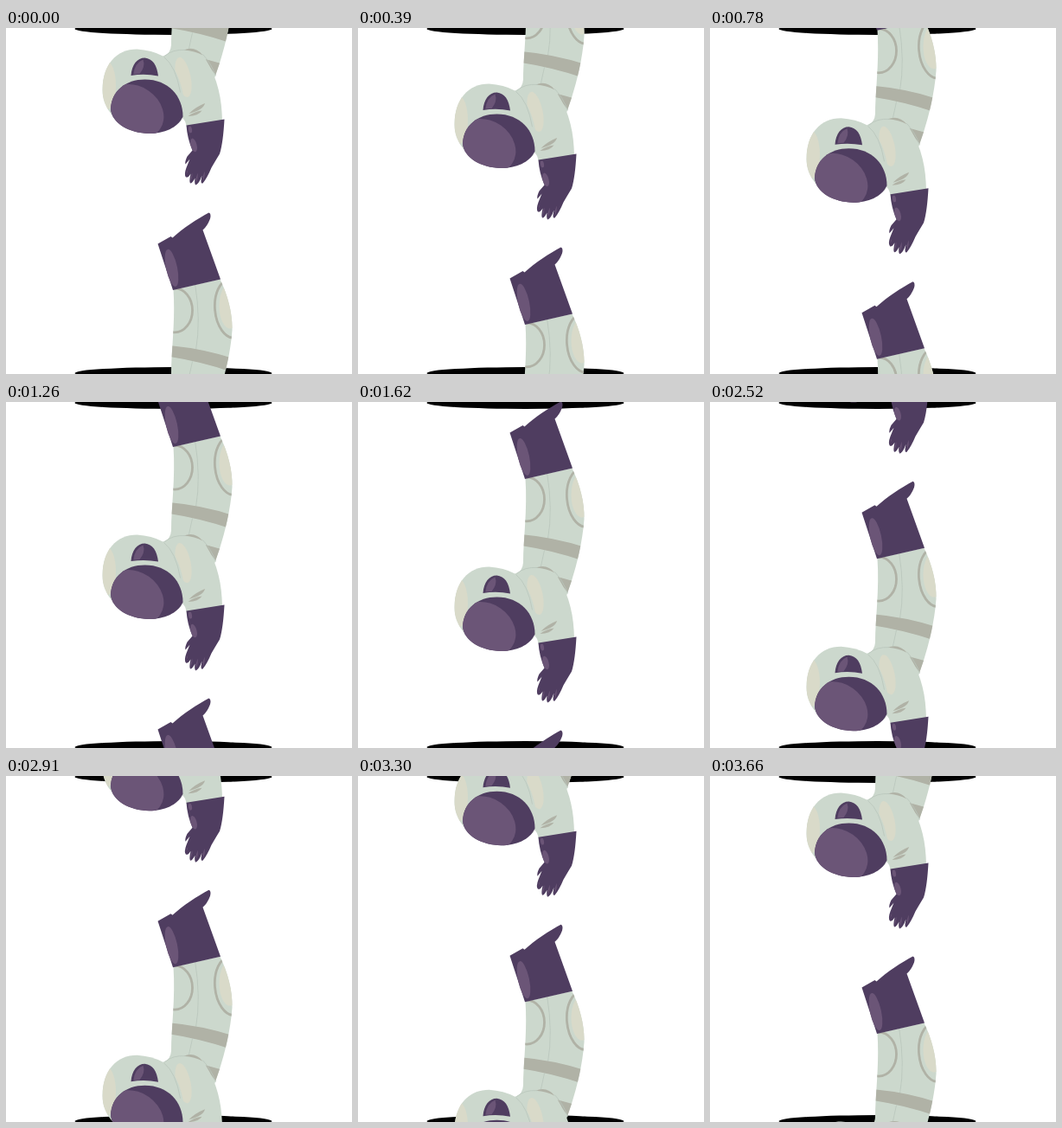
Recreate the animation shown at these times as an HTML page. Size 400x400 px, loop 3.69 s.

```html
<!DOCTYPE html>
<html lang="en">
<head>
<meta charset="utf-8">
<title>Endless fall</title>
<style>
  html, body { margin: 0; width: 100%; height: 100%; overflow: hidden; background: #fff; }
  svg { display: block; width: 100vw; height: 100vh; }
  .suit { fill: #ccd8cd; }
  .shade { fill: #b0b2a6; }
  .cream { fill: #d9dac9; }
  .dark { fill: #4f3d60; }
  .glow { fill: #6b5577; }
  .ring { fill: none; stroke: #b0b2a6; stroke-width: 2.8; }
  .seam { fill: none; stroke: #b9c6bb; stroke-width: .8; }
</style>
</head>
<body>
<svg viewBox="0 0 400 400">
  <defs>
    <path id="legShape" d="M193 129L247 117C256 136 261.500 156 261 176C259 203 252.500 228 246.500 247L240 266L206 275L182 240Q190 235 190.500 226C190.500 200 195.500 165 193 129Z"/>
    <path id="helmetShape" d="M111 72C111 43 127 25 151 25Q168 26 181 33C196 43 205 70 206 92L202 108Q175 122 150 118C125 111 111 92 111 72Z"/>
    <path id="visorShape" d="M120.500 94C121.500 73 138 60 160 60C187 60 204 79 204 103C198 116 182 122.500 165 122.500C142 122 122 111 120.500 94Z"/>
    <clipPath id="legClip"><use href="#legShape"/></clipPath>
    <clipPath id="helmetClip"><use href="#helmetShape"/></clipPath>
    <clipPath id="visorClip"><use href="#visorShape"/></clipPath>

    <g id="astronaut">
      <!-- legs and torso -->
      <use href="#legShape" class="suit"/>
      <g clip-path="url(#legClip)">
        <ellipse class="cream" cx="258.500" cy="148" rx="12.500" ry="26"/>
        <ellipse class="ring" cx="261" cy="151" rx="20" ry="34" transform="rotate(-5 261 151)"/>
        <ellipse class="ring" cx="194.500" cy="153" rx="20.500" ry="25.500"/>
        <path class="seam" d="M218 122Q225 165 219 199M215 212L210 235"/>
        <path class="shade" d="M188 193.500Q227 197 262 208.500L258 223.500Q224 212 188 206.500Z"/>
        <path class="shade" d="M228 242L250 248L244 264Z"/>
      </g>
      <!-- boot -->
      <path class="dark" d="M175 76L190 67.500L192 69C204 58 221 47 234 40Q237 41 235.500 47Q232 56 227 60L247.500 117L192.500 129.500Z"/>
      <ellipse class="glow" cx="191" cy="104" rx="6.500" ry="22" transform="rotate(-12 191 104)"/>

      <g transform="translate(0 206)">
        <!-- arm -->
        <path class="suit" d="M181 33Q192 27 207 26Q222 25 230 36C245 60 249 83 249.500 108L208 114Q207 107 203 104L190 70Z"/>
        <path class="shade" d="M205 26Q218 21 227 32Q218 27 205 26Z"/>
        <path class="seam" d="M183 33Q192 25 207 26M227 31Q237 42 242 56"/>
        <ellipse class="cream" cx="204.500" cy="57.500" rx="8.500" ry="23.500" transform="rotate(-12 204.500 57.500)"/>
        <path class="shade" d="M229.500 87.500Q228 95 211 99.500Q218 92 229.500 87.500ZM226 96Q222 102 210 102.500Q217 97 226 96Z"/>
        <!-- glove -->
        <path class="dark" d="M208 113L252 106C251 123 249.500 137 246.500 146Q241 155 237 162Q232 174 227 180Q225 181 225 177L226 171Q223 180 219 182Q217 181 218 174Q215 180 212.500 180Q211 178 213 169Q210 174 207.500 173Q205 170 208 162L212 152L207 158Q206 155 209 149L215 142Q209 128 208 113Z"/>
        <ellipse class="glow" cx="212.500" cy="118" rx="2" ry="4" transform="rotate(-10 212.500 118)"/>
        <ellipse class="glow" cx="216.500" cy="136" rx="3.500" ry="8" transform="rotate(-15 216.500 136)"/>
        <path class="glow" d="M210 164Q209 168 208 170Q208 166 210 164ZM215 168Q215 174 213 177Q213 172 215 168ZM221 168Q222 174 219 179Q219 173 221 168ZM229 166Q230 172 227 177Q227 171 229 166Z"/>
        <!-- helmet -->
        <use href="#helmetShape" class="suit"/>
        <ellipse class="cream" cx="116" cy="67" rx="10.500" ry="28" clip-path="url(#helmetClip)"/>
        <path class="seam" d="M182 34Q196 45 201 75"/>
        <use href="#visorShape" class="dark"/>
        <g clip-path="url(#visorClip)">
          <ellipse class="glow" cx="148" cy="97" rx="36" ry="29" transform="rotate(35 148 97)"/>
        </g>
        <path class="dark" d="M144 55.500C145 43 151 35 160 35C169 36 174 43 175.500 56Q160 53 144 55.500Z"/>
        <path class="glow" d="M147 54Q148 41 158 37Q161 45 154 53.500Z"/>
      </g>
    </g>
  </defs>

  <ellipse cx="193.500" cy="1" rx="114" ry="7"/>
  <ellipse cx="193.500" cy="399" rx="114" ry="7"/>
  <g id="fall">
    <use href="#astronaut" y="-380"/>
    <use href="#astronaut"/>
    <use href="#astronaut" y="380"/>
  </g>
</svg>
<script>
  const LOOP = 3690, STEP = 30, SPEED = 0.1025, LEFT = 0.5, START = -206.6;
  const fall = document.getElementById('fall');
  const begin = performance.now();

  function draw(now) {
    const time = Math.max(0, now - begin) % LOOP;
    const y = START + SPEED * Math.floor(time / STEP) * STEP;
    fall.setAttribute('transform', `translate(${LEFT} ${y})`);
    requestAnimationFrame(draw);
  }
  draw(begin);
</script>
</body>
</html>
```
